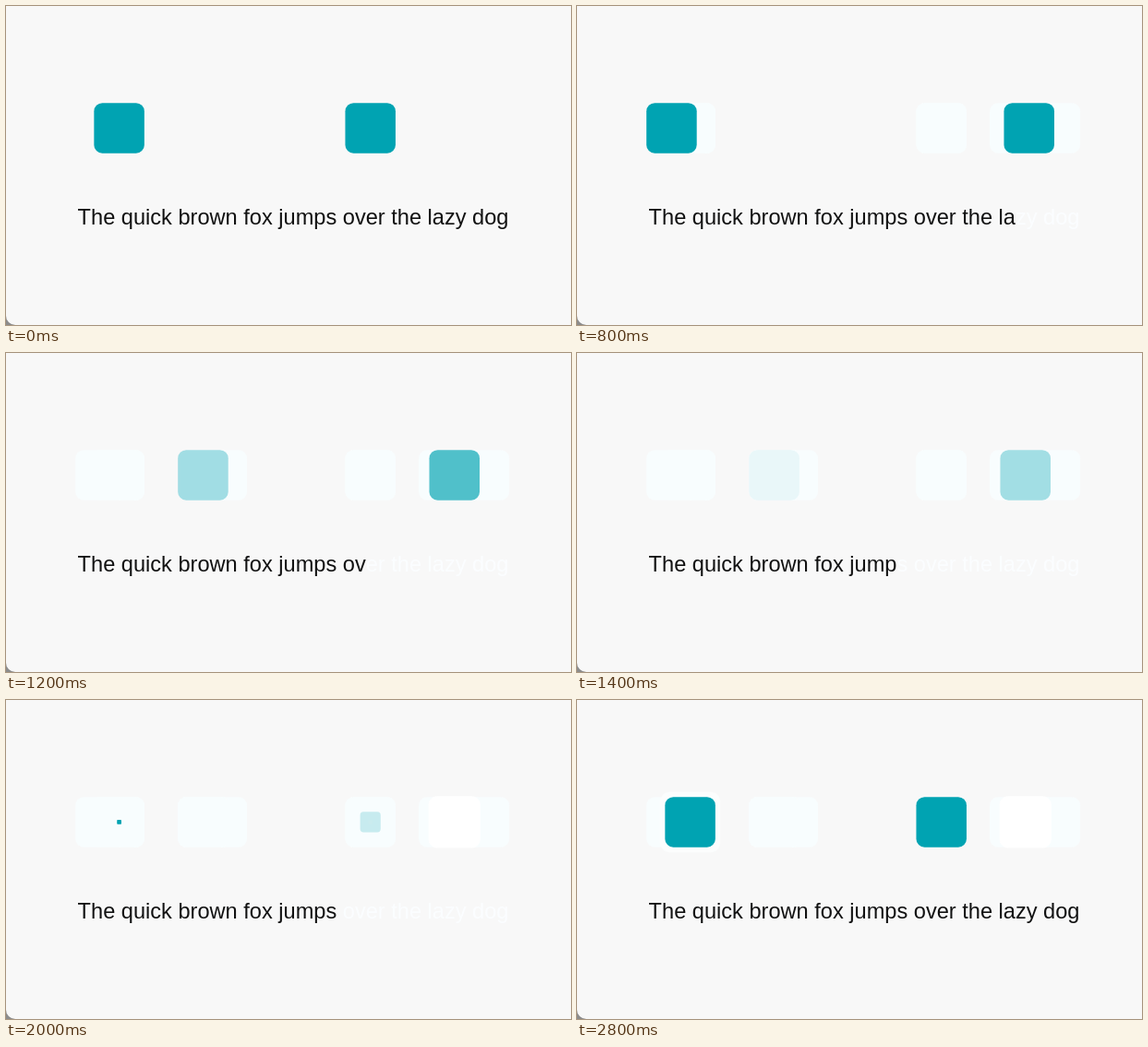
These frames come from a looping animation (612x346 px, 3600 ms). An HTML page with a canvas:

```html
<!DOCTYPE html>
<html lang="en">
<head>
<meta charset="utf-8">
<title>Tween demo</title>
<style>
  html, body { margin: 0; height: 100%; overflow: hidden; background: #f8f8f8; }
  canvas { display: block; }
</style>
</head>
<body>
<canvas id="stage" width="612" height="346"></canvas>
<script>
const ctx = document.getElementById('stage').getContext('2d');
const LOOP = 3600, STEP = 100, START = 5, REAPPEAR = 17, END = 28;
const TEXT = 'The quick brown fox jumps over the lazy dog';
const TEAL = '#00a3b2', PALE = '#f8fdfe';
const SIZE = 54.5, RADIUS = 9, CENTER_Y = 132.4;
const LEFT = 122.6, RIGHT = 394.7, TRAVEL = 91;

const clamp = v => Math.min(1, Math.max(0, v));

function wave(t, period) {
  return 2 ** (-10 * t) * Math.sin((t - period / 4) * 2 * Math.PI / period);
}
const elasticOut = t => t <= 0 ? 0 : 1 + wave(t, 0.3);

// u runs from -1 to 1, with the midpoint of the ease at 0
function elasticInOut(u) {
  if (Math.abs(u) >= 1) return u < 0 ? 0 : 1;
  const swing = wave(Math.abs(u), 0.245) / 2;
  return u < 0 ? -swing : 1 + swing;
}

// Both squares at a step: move, fade out, then grow back at home
function squaresAt(step) {
  if (step < REAPPEAR) {
    const visible = clamp(1 - (step - 10) * 0.163);
    return [
      { x: LEFT + TRAVEL * elasticInOut((step - 8.5) * 0.22), scale: 1, alpha: visible ** 2.65 },
      { x: RIGHT + TRAVEL * elasticOut((step - START) * 0.15), scale: 1, alpha: visible }
    ];
  }
  const grown = clamp((step - 18.8) * 0.163);
  return [
    { x: LEFT, scale: elasticInOut((step - 21.32) * 0.19), alpha: 1 },
    { x: RIGHT, scale: 1 - (1 - grown) ** 2.4, alpha: grown }
  ];
}

function drawSquare({ x, scale, alpha }, color) {
  const size = SIZE * Math.abs(scale);
  ctx.globalAlpha = alpha;
  ctx.fillStyle = color;
  ctx.beginPath();
  ctx.roundRect(x - size / 2, CENTER_Y - size / 2, size, size, RADIUS * Math.abs(scale));
  ctx.fill();
  ctx.globalAlpha = 1;
}

function drawText(text, color) {
  ctx.fillStyle = color;
  ctx.fillText(text, 77.6, 237);
}

function drawPanel() {
  ctx.fillStyle = '#8c8c8c';
  ctx.fillRect(0, 330, 16, 16);
  ctx.fillStyle = '#f8f8f8';
  ctx.beginPath();
  ctx.roundRect(0, 0, 612, 346, [0, 0, 0, 10]);
  ctx.fill();
}

// Faint marks left wherever the squares and letters have been
function drawTrail(step) {
  for (let past = START - 1; past < step; past++) {
    const color = past < REAPPEAR ? PALE : '#fcfdfd';
    for (const square of squaresAt(past)) drawSquare({ ...square, alpha: 1 }, color);
  }
  if (step >= REAPPEAR) drawSquare({ x: RIGHT + TRAVEL, scale: 1.03, alpha: 1 }, '#fff');
  drawText(TEXT, '#fbfdff');
}

function draw(now) {
  const step = Math.min(END, Math.floor(now % LOOP / STEP));
  ctx.font = '23.6px "Liberation Sans", Arial, sans-serif';
  drawPanel();
  if (step >= START) drawTrail(step);
  for (const square of squaresAt(step)) drawSquare(square, TEAL);

  const removed = 2.1 * Math.max(0, Math.min(step - START, END - step));
  drawText(TEXT.slice(0, Math.round(TEXT.length - removed)), '#111');
}

let origin;
function tick(now) {
  origin ??= now;
  draw(now - origin);
  requestAnimationFrame(tick);
}
draw(0);
requestAnimationFrame(tick);
</script>
</body>
</html>
```
